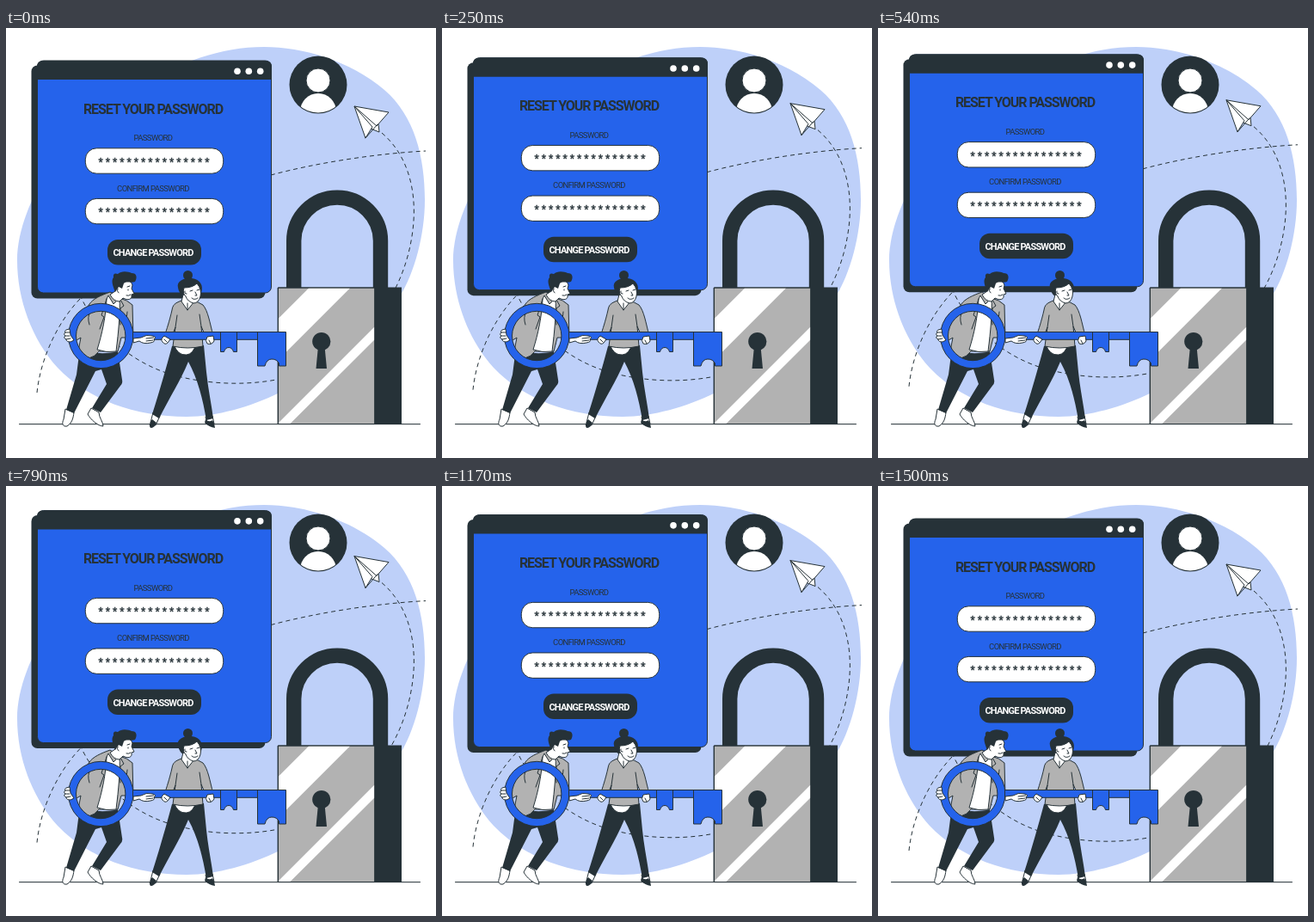
Recreate the animation shown at these times as an HTML page. Size 500 by 500 pixels, loop 1540 ms.

```html
<!DOCTYPE html>
<html lang="en">
<head>
<meta charset="utf-8">
<title>Reset your password</title>
<style>
  html, body { margin: 0; width: 100%; height: 100%; overflow: hidden; background: #fff; }
  svg { display: block; width: 100%; height: 100%; }
  text { font-family: Roboto, "Open Sans", sans-serif; text-anchor: middle; fill: #263238; }
  .title { font-size: 16px; font-weight: 700; letter-spacing: -1.05px; }
  .label { font-size: 9.5px; letter-spacing: -.62px; }
  .stars { font: 13.75px "Liberation Mono", monospace; stroke: #263238; stroke-width: .4; }
  .action { font-size: 11px; font-weight: 700; letter-spacing: -.8px; fill: #fff; }
  .ink { fill: #263238; }
  .blue, .grey, .white { stroke: #263238; stroke-width: 1; stroke-linejoin: round; }
  .blue { fill: #2563eb; }
  .grey { fill: #b2b2b2; }
  .white { fill: #fff; }
  .line, .dash { fill: none; stroke: #263238; stroke-width: 1; stroke-linecap: round; }
  .dash { stroke-dasharray: 5 4; stroke-linecap: butt; }
  .fine { stroke-width: .8; }
</style>
</head>
<body>
<svg viewBox="0 0 500 500">
  <defs>
    <clipPath id="badge"><circle cx="363" cy="66" r="32.6"/></clipPath>
  </defs>

  <path fill="#bed0f9" d="M300 22C345 22 400 38 440 72C475 102 487 150 487 200C487 240 475 285 458 312C430 350 370 400 316 425C285 440 245 452 210 452C150 452 95 432 60 395C30 362 13 315 13 270C13 235 30 195 50 165C100 95 200 22 300 22Z"/>

  <g id="avatar">
    <circle class="ink" cx="363" cy="66" r="33.5"/>
    <circle fill="#fff" cx="363" cy="97" r="21" clip-path="url(#badge)"/>
    <circle fill="#fff" stroke="#263238" cx="363" cy="61" r="14"/>
  </g>

  <g id="float">
    <path class="dash" d="M36 424C40 385 60 340 90 311"/>
    <path class="dash" d="M308 171C360 157 430 146 488 143"/>
    <path class="dash" d="M437 122C470 150 478 195 473 235C465 300 430 350 380 385C330 415 260 420 200 405C140 390 100 345 85 308"/>

    <g id="plane">
      <path class="white" d="M405 91L433 111L434 121L424 117Z"/>
      <path class="white" d="M405 91L445 98L431 114Z"/>
      <path class="white" d="M405 91L418 128L426 115Z"/>
      <path class="line" d="M418 128L432 112"/>
    </g>

    <g id="window">
      <rect class="ink" x="29.5" y="43.5" width="272" height="271" rx="7"/>
      <rect class="blue" x="36.5" y="38" width="272" height="270" rx="7"/>
      <path class="ink" d="M36 60V45Q36 38 43 38H302Q309 38 309 45V60Z"/>
      <g fill="#fff">
        <circle cx="269" cy="50.3" r="3.8"/>
        <circle cx="282.3" cy="50.3" r="3.8"/>
        <circle cx="295.7" cy="50.3" r="3.8"/>
      </g>
      <text class="title" x="171" y="99.5">RESET YOUR PASSWORD</text>
      <text class="label" x="171" y="131">PASSWORD</text>
      <rect class="white" x="92.3" y="139.8" width="160.4" height="29.4" rx="13"/>
      <text class="stars" x="172" y="161.8">****************</text>
      <text class="label" x="171" y="189.6">CONFIRM PASSWORD</text>
      <rect class="white" x="92.3" y="198.4" width="160.4" height="29.4" rx="13"/>
      <text class="stars" x="172" y="220.4">****************</text>
      <rect class="ink" x="118" y="246" width="109" height="29.5" rx="12"/>
      <text class="action" x="171" y="265">CHANGE PASSWORD</text>
    </g>
  </g>

  <path class="line" d="M15.5 460.6H481.5"/>

  <g id="lock">
    <path fill="none" stroke="#263238" stroke-width="17.4" d="M334.7 303V247.5A50.4 50.4 0 0 1 435.5 247.5V303"/>
    <path class="grey" d="M316.5 302H429V460.5H316.5Z"/>
    <path fill="#fff" d="M352 302.5H400L317 385.5V337.5ZM428.5 347.5V362.5L330.5 460H317V459Z"/>
    <path class="line" d="M316.5 302H429V460.5H316.5Z"/>
    <path class="ink" d="M428.5 301.5H460V461H428.5Z"/>
    <circle class="ink" cx="366.8" cy="364.5" r="10.6"/>
    <path class="ink" d="M363 370H370.5L373 396H360.5Z"/>
  </g>

  <g id="man" class="fine">
    <path class="white" d="M69 443L79 447C78 454 77 459 71 463C65 464 65 459 67 455Z"/>
    <path class="white" d="M99 442L108 447C108 453 113 458 113 463C107 463 98 455 95 449Z"/>
    <path class="ink" d="M86 372C100 380 118 379 130 376L135 409Q136 413 133 416L110 447L100 442L117 414L111 397L104 399L79 448L70 444L82 403Z"/>
    <path class="grey" d="M121 307C110 311 101 315 97 321C90 333 80 345 73 352L79 365L87 360L83 381Q98 389 108 376H130L134 360H148L147 322Q141 316 132 314Z"/>
    <path class="white" d="M119 311L125 321L132 314C133 330 131 352 128 376Q117 378 106 374C112 355 116 335 117 315Z"/>
    <path class="line" d="M97 345Q94 336 98 330M117 315L111 334L114 336L109 350M132 314L137 323L133 326V345M141 330Q138 345 146 353"/>
    <path class="white" d="M127 300L136 293Q146 293 147 299L146 303L149 309L146 310C147 316 142 317 136 314L132 318Q125 318 121 310L127 306Z"/>
    <path class="ink" d="M127 307C124 299 122 294 125 290Q124 284 130 286C134 282 142 283 146 285C152 285 153 290 150 295C146 297 140 294 137 297L135 303L131 301Z"/>
    <path class="line" d="M141 301L144 300M142 304V305M140 311Q143 312 145 310M130 303Q128 306 131 308"/>
  </g>

  <g id="woman">
    <path class="white" d="M171 447L179 451L174 462L168 459ZM232 452L240 451L242 460L234 461Z"/>
    <path class="ink" d="M193 370L230 369L233 400C235 420 239 438 241 454L233 456C229 432 223 408 212 388C203 410 190 430 178 454L170 449C179 421 186 396 193 370Z"/>
    <path class="ink" d="M170 455L175 459Q173 465 168 465Q165 461 170 455ZM232 455Q236 459 240 456Q243 460 243 465Q236 464 231 459Z"/>
    <path class="white" d="M195 367Q199 381 210 380Q218 379 221 367Z"/>
    <path class="grey" d="M204 317C196 320 194 322 193 328C190 341 187 350 184 359L191 363L197 348L194 370Q211 374 229 370L227 347L234 363L241 358C237 343 235 329 229 322Q224 319 218 317Z"/>
    <path class="line" d="M197 348L199 334M227 347L225 333"/>
    <circle class="ink" cx="211.5" cy="287.5" r="5.5"/>
    <path class="ink" d="M200 302C198 294 208 290 216 291C226 292 230 300 227 308L222 317L208 314Q201 309 200 302Z"/>
    <path class="white" d="M206 310L204 318L211 328L219 318L218 313Z"/>
    <path class="white" d="M207 302Q217 302 222 297Q228 304 226 312Q224 320 218 320Q211 318 209 312Q205 309 207 302Z"/>
    <path class="line" d="M214 306L217 305M222 305L225 304M220 307L222 311H220M216 314Q219 317 223 314M208 306Q207 309 210 309M211 320L211 328"/>
  </g>

  <g id="key">
    <path class="blue" fill-rule="evenodd" d="M72.5 358a37.7 37.7 0 1 0 75.4 0a37.7 37.7 0 1 0 -75.4 0ZM81.5 358a28.7 28.7 0 1 0 57.4 0a28.7 28.7 0 1 0 -57.4 0Z"/>
    <path class="blue" d="M147.5 353.5H325.5V393H317.5V390Q315 385 309 385Q303 385 301 393H292.5V362.3H268.5V376.5H264.5Q263 371.5 259 371.5Q255 371.5 253.5 376.5H249.5V362.3H147.5Z"/>
    <path class="line" d="M249.5 353.5V363M268.5 353.5V363M292.5 353.5V363"/>
  </g>

  <g id="hands">
    <path class="white" d="M74 350Q67 351 69 354Q66 356 69 358Q66 360 70 362Q70 365 75 365L79 363L75 357Z"/>
    <path class="line" d="M69 354L74 354M69 358H74M70 362L75 361"/>
    <path class="white" d="M148 361L157 360Q163 356 170 358Q176 359 172 362Q174 365 168 366Q160 368 155 364L148 366Z"/>
    <path class="line" d="M163 361L172 360M163 364L171 363"/>
    <path class="white" d="M184 358Q179 362 182 365Q185 369 188 366L191 362Z"/>
    <path class="white" d="M234 359Q231 364 234 367Q239 369 242 364L241 358Z"/>
    <path class="line" d="M184 362L187 365M236 363L238 367"/>
  </g>
</svg>
<script>
  const LOOP = 1540, STEP = 1000 / 24, STEPS = 36, RISE = 10;
  const float = document.getElementById("float");

  // Linear bob at 24 steps a second, resting on the last step.
  function draw(now) {
    const t = now % LOOP;
    const step = Math.min(STEPS, Math.floor((t + 5) / STEP));
    const y = -RISE * (1 - Math.abs(1 - 2 * step / STEPS));
    float.setAttribute("transform", `translate(0 ${y.toFixed(3)})`);
  }

  const start = performance.now();
  function tick() {
    draw(performance.now() - start);
    requestAnimationFrame(tick);
  }
  tick();
</script>
</body>
</html>
```
